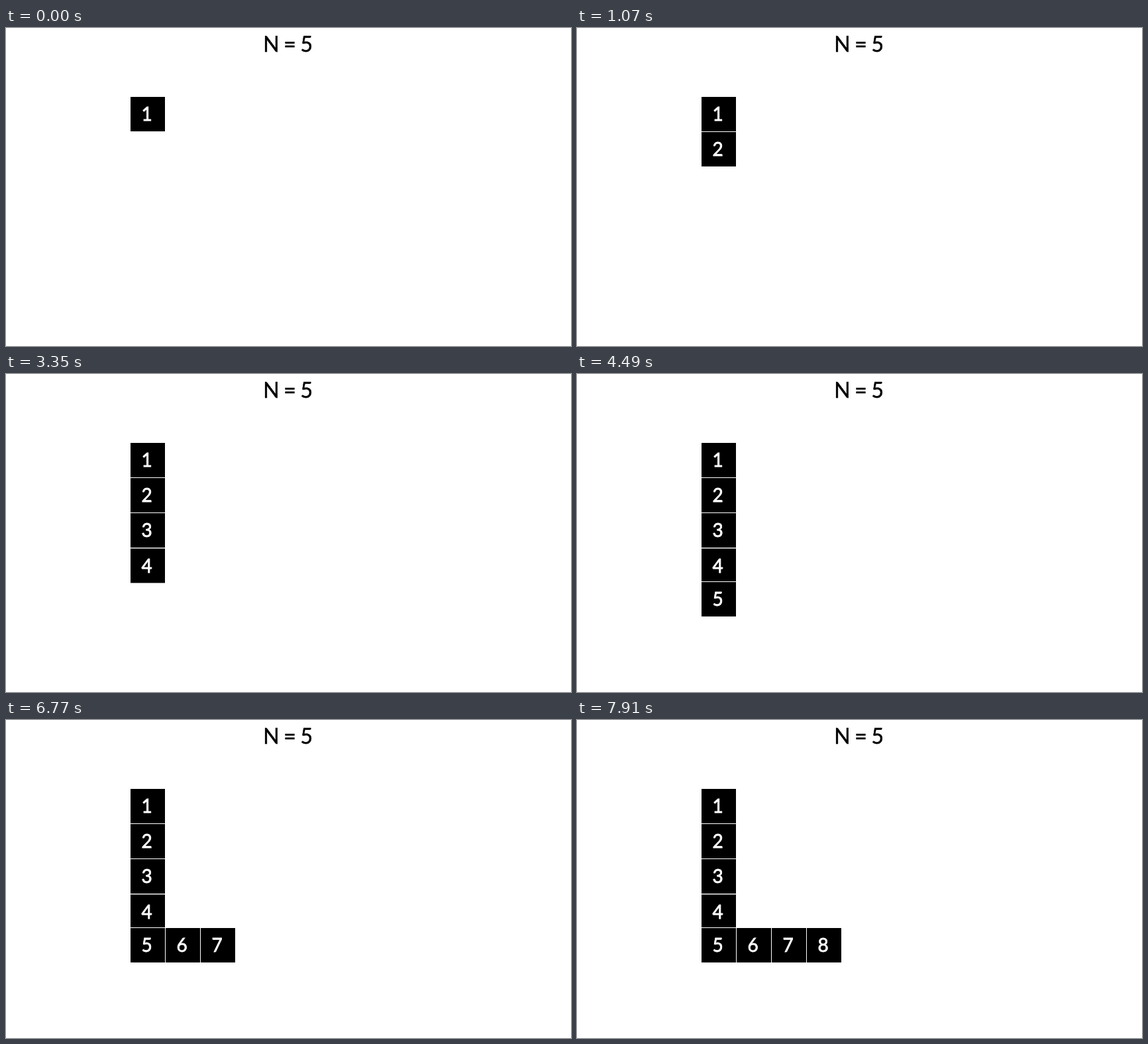
Animation, 853 px wide and 480 px high, one loop 8 s. Source, as an HTML page:

```html
<!DOCTYPE html>
<html lang="en">
<head>
<meta charset="utf-8">
<title>Counting squares</title>
<style>
  html, body { margin: 0; width: 100%; height: 100%; overflow: hidden; background: #fff; }
  svg { display: block; width: 853px; height: 480px; }
  text { font-family: Carlito, Lato, sans-serif; text-anchor: middle; }
  .title { font-size: 32px; word-spacing: -1.5px; fill: #000; stroke: #000; stroke-width: .5; }
  .digit { font-size: 28px; fill: #fff; stroke: #fff; stroke-width: .8; }
</style>
</head>
<body>
<svg id="stage" viewBox="0 0 853 480">
  <text class="title" x="425.7" y="36">N = 5</text>
</svg>
<script>
const LOOP = 8000, FIRST = 1070, STEP = 1140;
const SIZE = 52, PITCH = 53, LEFT = 188;
const rows = [104, 157, 210, 263.4, 314];
const stage = document.getElementById('stage');

function add(parent, tag, attributes = {}, content = '') {
  const node = document.createElementNS('http://www.w3.org/2000/svg', tag);
  for (const name in attributes) node.setAttribute(name, attributes[name]);
  node.textContent = content;
  return parent.appendChild(node);
}

// Down the left column, then along the bottom row.
const cells = Array.from({ length: 8 }, (_, i) => {
  const x = LEFT + PITCH * Math.max(0, i - 4);
  const y = rows[Math.min(i, 4)];
  const cell = add(stage, 'g');
  add(cell, 'rect', { x: x - 1, y: y - 1, width: SIZE + 1, height: SIZE + 1, fill: '#fff' });
  add(cell, 'rect', { x, y, width: SIZE, height: SIZE });
  add(cell, 'text', { class: 'digit', x: x + 24.5, y: y + 36.4 }, i + 1);
  return cell;
});

const start = performance.now();
function draw() {
  const time = (performance.now() - start) % LOOP;
  cells.forEach((cell, i) => {
    const shown = i === 0 || time >= FIRST + STEP * (i - 1);
    cell.setAttribute('visibility', shown ? 'visible' : 'hidden');
  });
  requestAnimationFrame(draw);
}
draw();
</script>
</body>
</html>
```
